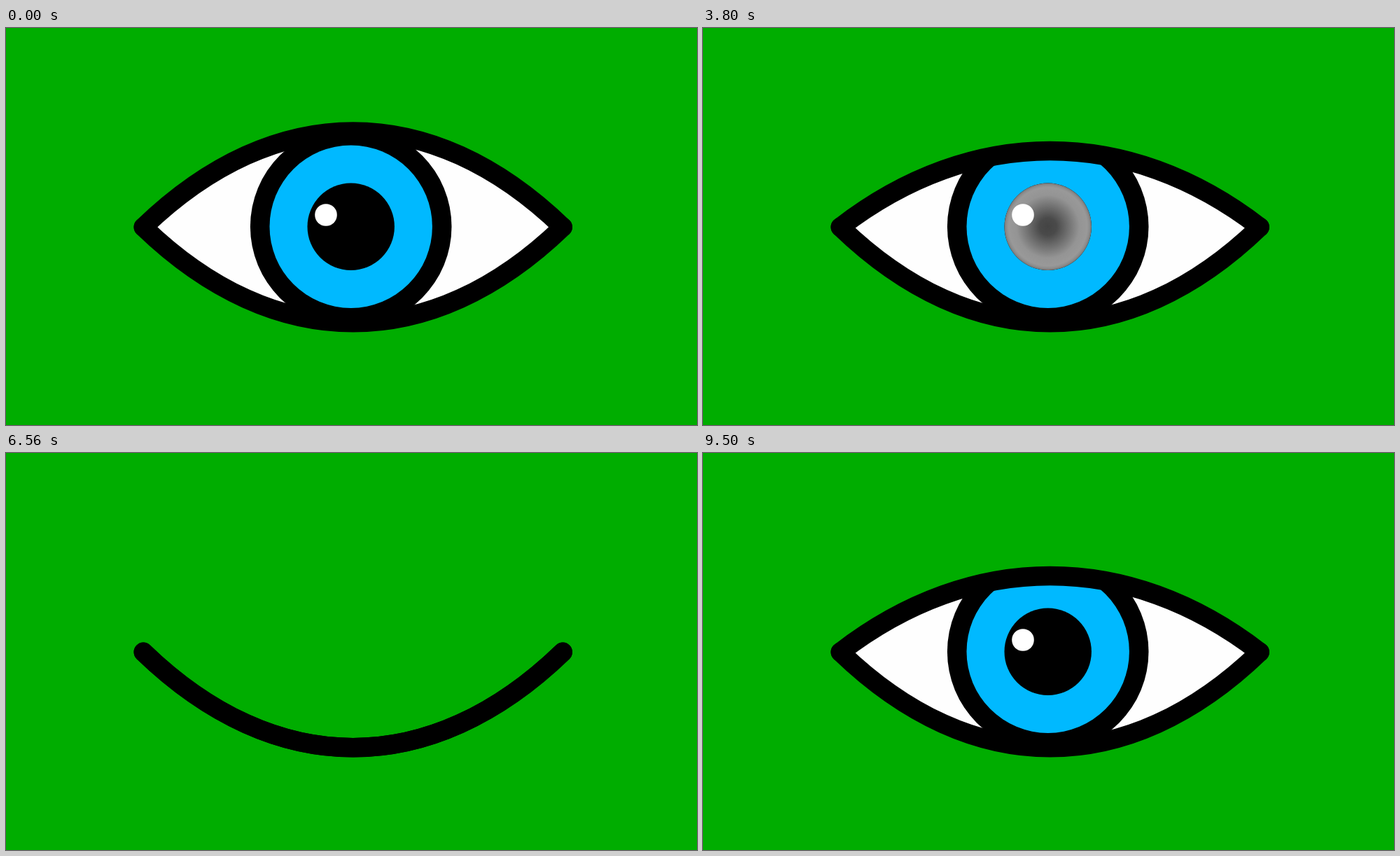
An HTML page with a canvas for the animation above (9.54 s loop, 987x567 px).

```html
<!DOCTYPE html>
<html lang="en">
<head>
<meta charset="utf-8">
<title>Blinking eye</title>
<style>
  html, body { margin: 0; width: 100%; height: 100%; overflow: hidden; background: #00ad00; }
  canvas { display: block; }
</style>
</head>
<body>
<canvas id="stage" width="987" height="567"></canvas>
<script>
const ctx = document.getElementById('stage').getContext('2d');
const LOOP = 9540, CLOSED = 11, BEND = 136.4;
const LEFT = 196.3, RIGHT = 795.2, AXIS = 284.3;
const MID = (LEFT + RIGHT) / 2, FULLNESS = 111;
const IRIS = { x: 492.7, y: 283.7 }, PUPIL = 62.2;

// Each blink: closing start and step count, opening start and step length.
const blinks = [
  { close: 1400, steps: 11, open: 2000, stepMs: 40 },
  { close: 3800, steps: 11, open: 4400, stepMs: 40 },
  { close: 6200, steps: 10, open: 6760, stepMs: 38 },
  { close: 8540, steps: 11, open: 9140, stepMs: 40 }
];

function disc(x, y, r, fill) {
  ctx.fillStyle = fill;
  ctx.beginPath();
  ctx.arc(x, y, r, 0, 2 * Math.PI);
  ctx.fill();
}

function glow(x, y, r, stops) {
  const gradient = ctx.createRadialGradient(x, y, 0, x, y, r);
  for (const [at, color] of stops) gradient.addColorStop(at, color);
  disc(x, y, r, gradient);
}

const spot = [[0, '#b3b3b3'], [0.36, '#b0b0b0'], [1, 'rgba(176,176,176,0)']];

const pupils = [
  () => {},
  () => glow(IRIS.x, IRIS.y, PUPIL, [
    [0, '#444'], [0.2, '#4a4a4a'], [0.72, '#949494'], [0.9, '#999'], [0.95, '#8e8e8e'], [1, '#787878']
  ]),
  () => {
    glow(518, 283, 29, spot);
    glow(487, 320, 14, spot);
  },
  () => glow(IRIS.x, IRIS.y, 50, spot)
];

// How far the lid is shut, from 0 (open) to CLOSED, and which pupil is showing.
function poseAt(t) {
  let shut = 0, kind = 0;
  blinks.forEach((blink, i) => {
    if (t < blink.close) return;
    if (t < blink.open) {
      const step = Math.floor((t - blink.close) / 40) + 1;
      shut = Math.min(CLOSED, step * CLOSED / blink.steps);
    } else {
      const step = Math.floor((t - blink.open) / blink.stepMs) + 1;
      shut = Math.max(0, CLOSED - step);
      kind = (i + 1) % pupils.length;
    }
  });
  return { shut, kind };
}

function lidBend(shut) {
  return shut ? Math.min(BEND, 25.1 * shut - 133.8) : -BEND;
}

// Continues the current path along a lid that ends at x = to.
function lidTo(to, bend) {
  const side = Math.sign(to - MID) * FULLNESS;
  const y = AXIS + bend * 4 / 3;
  ctx.bezierCurveTo(MID - side, y, MID + side, y, to, AXIS);
}

function strokeLid(bend) {
  ctx.beginPath();
  ctx.moveTo(LEFT, AXIS);
  lidTo(RIGHT, bend);
  ctx.stroke();
}

function draw(t) {
  const { shut, kind } = poseAt(t);
  const upper = lidBend(shut);
  ctx.fillStyle = '#00ad00';
  ctx.fillRect(0, 0, 987, 567);

  if (shut < CLOSED) {
    ctx.save();
    ctx.beginPath();
    ctx.moveTo(LEFT, AXIS);
    lidTo(RIGHT, upper);
    lidTo(LEFT, BEND);
    ctx.clip();
    ctx.fillStyle = '#fefefe';
    ctx.fillRect(LEFT, 130, RIGHT - LEFT, 310);
    disc(IRIS.x, IRIS.y, 143.8, '#000');
    disc(IRIS.x, IRIS.y, 116.2, '#00b9ff');
    disc(IRIS.x, IRIS.y, PUPIL, '#000');
    pupils[kind]();
    disc(457, 267, 15.8, '#fff');
    ctx.restore();
  }

  ctx.strokeStyle = '#000';
  ctx.lineWidth = 27.5;
  ctx.lineCap = 'round';
  strokeLid(upper);
  strokeLid(BEND);
}

const start = performance.now();
function tick() {
  draw((performance.now() - start) % LOOP);
  requestAnimationFrame(tick);
}
tick();
</script>
</body>
</html>
```
